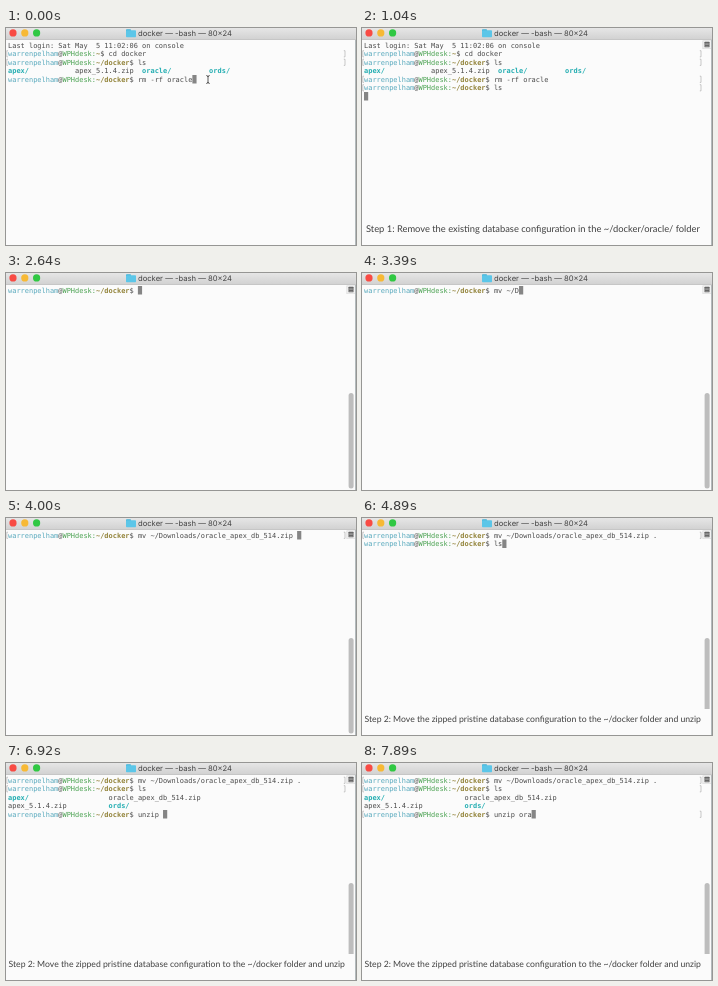
Recreate the animation shown at these times as an HTML page with a canvas. Size 350x217 px, loop 8000 ms.

```html
<!DOCTYPE html>
<html lang="en">
<head>
<meta charset="utf-8">
<title>Terminal session</title>
<style>
  html, body { margin: 0; width: 100%; height: 100%; overflow: hidden; background: #fbfbfb; }
  canvas { display: block; width: 350px; height: 217px; }
</style>
</head>
<body>
<canvas id="stage"></canvas>
<script>
const W = 350, H = 217, LOOP = 8000;
const COL = 4.19, ROW = 8.5, LEFT = 2, TOP = 13;
const MONO = '"DejaVu Sans Mono", monospace';
const PAPER = '#fbfbfb', INK = '#4a4a4a';
const CYAN = '#58a9bd', DIR = '#25aeb2', GREEN = '#4ba252', OLIVE = '#93843b';

const canvas = document.getElementById('stage');
const ctx = canvas.getContext('2d');
const dpr = window.devicePixelRatio || 1;
canvas.width = W * dpr;
canvas.height = H * dpr;

// A line is a list of runs: [column, text, colour, bold]
const dir = (col, name) => [col, name, DIR, true];
const file = (col, name) => [col, name, INK];

function promptLine(path, command = '') {
  const end = 21 + path.length;
  return {
    runs: [
      [0, 'warrenpelham', CYAN], [12, '@', INK], [13, 'WPHdesk:', GREEN],
      [21, path, OLIVE, true], [end, '$', INK]
    ],
    start: end + 2, command, marked: false
  };
}
const output = (...runs) => ({ runs });
const marked = line => ({ ...line, marked: true });
const last = lines => lines[lines.length - 1];

const newPrompt = s => s.push(promptLine('~/docker'));
const type = text => s => { last(s).command += text; };
const mark = s => { last(s).marked = true; };
const enter = s => { mark(s); s.push(output()); };
const print = (...lines) => s => { s.pop(); s.push(...lines); newPrompt(s); };
const enterQuiet = s => { mark(s); newPrompt(s); };
const clear = s => { s.length = 0; newPrompt(s); };
const keys = (t, step, text) => [...text].map((ch, i) => [t + i * step, type(ch)]);

const opening = () => [
  output(file(0, 'Last login: Sat May  5 11:02:06 on console')),
  marked(promptLine('~', 'cd docker')),
  marked(promptLine('~/docker', 'ls')),
  output(dir(0, 'apex/'), file(16, 'apex_5.1.4.zip'), dir(32, 'oracle/'), dir(48, 'ords/')),
  promptLine('~/docker', 'rm -rf oracle')
];

const script = [
  [120, enterQuiet],
  ...keys(570, 20, 'ls'),
  [980, enter],
  [1140, print(output(dir(0, 'apex/'), file(16, 'apex_5.1.4.zip'), dir(32, 'ords/')))],
  ...keys(1610, 90, 'clear'),
  [2420, clear],
  ...keys(2740, 100, 'mv'),
  [3040, type(' ')],
  ...keys(3210, 65, '~/Dow'),
  [3540, type('nloads/')],
  [3540, mark],
  ...keys(3610, 65, 'oracl'),
  [4000, type('e_apex_db_514.zip ')],
  [4380, type('.')],
  [4540, enterQuiet],
  ...keys(4740, 100, 'ls'),
  [4990, enter],
  [5160, print(
    output(dir(0, 'apex/'), file(24, 'oracle_apex_db_514.zip')),
    output(file(0, 'apex_5.1.4.zip'), dir(24, 'ords/')))],
  ...keys(5720, 100, 'unzip '),
  ...keys(7520, 100, 'ora'),
  [7820, mark]
];

function sessionAt(t) {
  const lines = opening();
  for (const [at, act] of script) if (t >= at) act(lines);
  return lines;
}

function rect(x, y, w, h, colour, radius = 0) {
  ctx.fillStyle = colour;
  ctx.beginPath();
  ctx.roundRect(x, y, w, h, radius);
  ctx.fill();
}

function label(text, x, y, font, colour) {
  ctx.font = font;
  ctx.fillStyle = colour;
  ctx.fillText(text, x, y);
}

function drawTitleBar() {
  const shade = ctx.createLinearGradient(0, 0, 0, 11);
  shade.addColorStop(0, '#e6e6e6');
  shade.addColorStop(1, '#d2d2d2');
  rect(0, 0, W, 11, shade);
  rect(0, 11, W, 0.8, '#b4b4b4');
  ['#f84b44', '#f7b935', '#30c843'].forEach((colour, i) => {
    ctx.fillStyle = colour;
    ctx.beginPath();
    ctx.arc(7 + i * 11.8, 4.9, 3.6, 0, Math.PI * 2);
    ctx.fill();
  });
  rect(120, 1.2, 5, 3, '#42b3d8', 0.8);
  rect(120, 2.2, 10, 7, '#5cc6e8', 0.8);
  label('docker — -bash — 80×24', 132, 7.8, '7.65px Inter, sans-serif', '#444');
}

function drawScrollArea(t) {
  rect(349, 12, 1, H - 12, '#b3babc');
  if (t < 20) return;
  rect(340.5, 12.5, 8.5, 8.5, '#d6d6d6');
  rect(341.2, 13, 7.8, 7.5, '#f2f2f2');
  rect(342.5, 13.8, 5, 5.4, '#5c5c5c', 0.5);
  for (let y = 14.9; y < 18; y += 1.5) rect(343.2, y, 3.6, 0.5, '#ccc');
  if (t >= 2420) rect(342.6, 120, 5, 95.5, '#bdbdbd', 2.5);
}

function drawBracket(x, y, dx) {
  ctx.strokeStyle = '#a5a5a5';
  ctx.lineWidth = 0.6;
  ctx.beginPath();
  ctx.moveTo(x + dx, y + 1.2);
  ctx.lineTo(x, y + 1.2);
  ctx.lineTo(x, y + 7.4);
  ctx.lineTo(x + dx, y + 7.4);
  ctx.stroke();
}

function drawRun([col, text, colour, bold], y) {
  ctx.font = `${bold ? 'bold ' : ''}6.95px ${MONO}`;
  ctx.fillStyle = colour;
  [...text].forEach((ch, i) => ctx.fillText(ch, LEFT + (col + i) * COL, y + 6.5));
}

function drawSession(lines) {
  lines.forEach((line, i) => {
    const y = TOP + i * ROW;
    line.runs.forEach(run => drawRun(run, y));
    if (line.command) drawRun(file(line.start, line.command), y);
    if (line.marked) {
      drawBracket(0.8, y, 1.2);
      drawBracket(339, y, -1.2);
    }
  });
  const line = last(lines);
  const col = line.start ? line.start + line.command.length : 0;
  rect(LEFT + col * COL, TOP + (lines.length - 1) * ROW, COL, ROW, '#858585');
}

function drawPointer() {
  ctx.strokeStyle = '#333';
  ctx.lineWidth = 0.8;
  ctx.beginPath();
  ctx.moveTo(200.3, 47.5);
  ctx.quadraticCurveTo(202, 47.5, 202, 49);
  ctx.quadraticCurveTo(202, 47.5, 203.7, 47.5);
  ctx.moveTo(202, 48.5);
  ctx.lineTo(202, 54.5);
  ctx.moveTo(200.3, 55.5);
  ctx.quadraticCurveTo(202, 55.5, 202, 54);
  ctx.quadraticCurveTo(202, 55.5, 203.7, 55.5);
  ctx.stroke();
}

const ramp = (t, from, to) => Math.min(1, Math.max(0, (t - from) / (to - from)));

// The caption sits on an opaque strip that hides the foot of the window.
function drawCaption(text, x, size, alpha) {
  if (alpha <= 0) return;
  ctx.globalAlpha = alpha;
  rect(0, 191, 349, H - 191, PAPER);
  label(text, x, 204, `${size}px Lato, sans-serif`, '#404040');
  ctx.globalAlpha = 1;
}

function draw(t) {
  ctx.setTransform(dpr, 0, 0, dpr, 0, 0);
  ctx.textRendering = 'geometricPrecision';
  rect(0, 0, W, H, PAPER);
  drawTitleBar();
  drawScrollArea(t);
  drawSession(sessionAt(t));
  if (t < 20) drawPointer();
  drawCaption('Step 1: Remove the existing database configuration in the ~/docker/oracle/ folder',
    4, 9.36, ramp(t, 70, 370) * (1 - ramp(t, 2020, 2320)));
  drawCaption('Step 2: Move the zipped pristine database configuration to the ~/docker folder and unzip',
    2.5, 8.66, ramp(t, 4040, 4230));
}

const begin = performance.now();
function frame() {
  draw((performance.now() - begin) % LOOP);
  requestAnimationFrame(frame);
}
frame();
</script>
</body>
</html>
```
